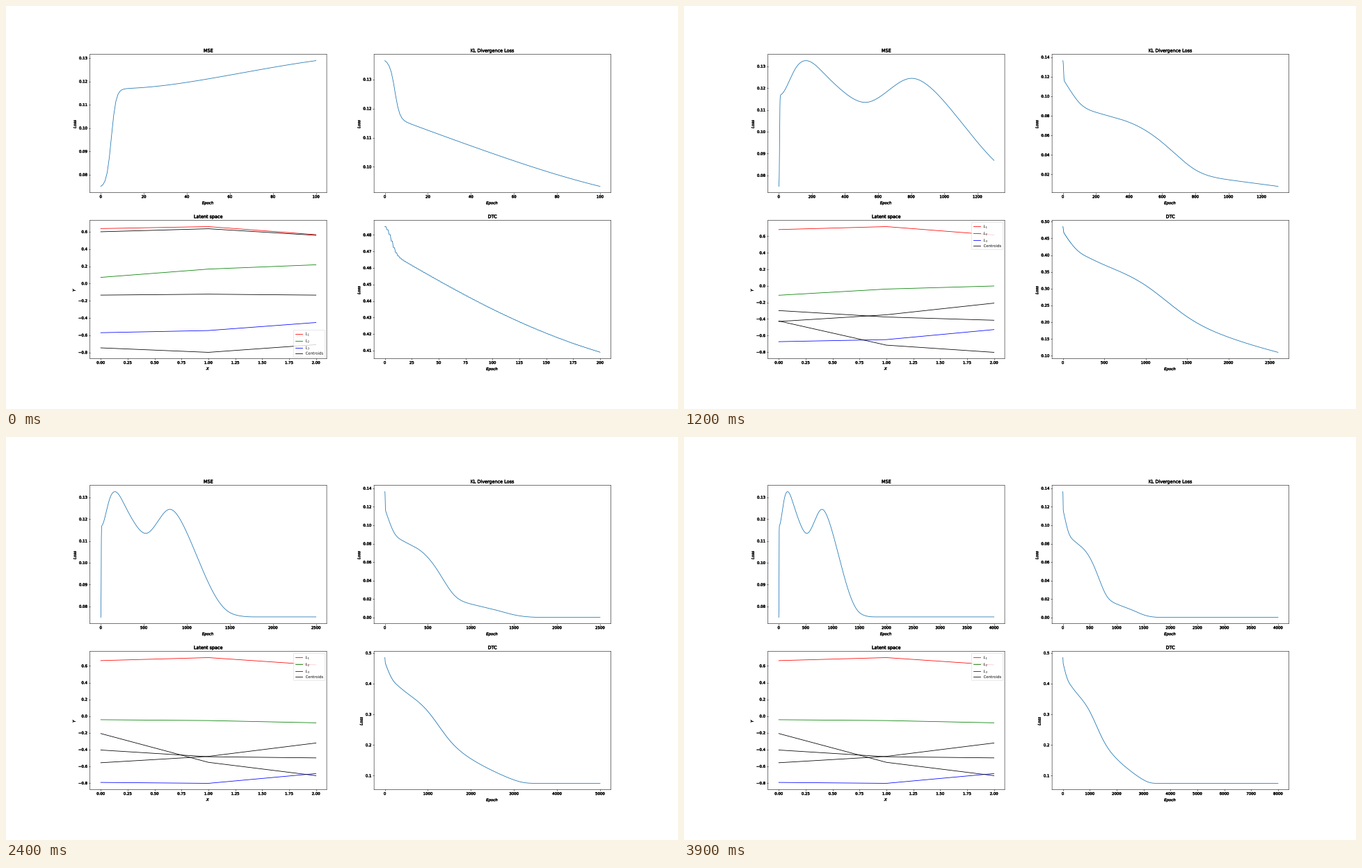
Animation of 966 by 580 pixels, one loop 4000 ms. Source, as a matplotlib script:

```python
import numpy as np
import matplotlib.pyplot as plt
from matplotlib import patheffects as pe
from matplotlib.animation import FuncAnimation

W, H, DPI = 966, 580, 38.64
FRAMES, INTERVAL, EPOCHS_PER_FRAME = 40, 100, 100
EPOCHS = np.arange(FRAMES * EPOCHS_PER_FRAME + 1)

plt.rcParams.update({
    "font.family": "DejaVu Sans", "font.size": 10, "axes.titlesize": 12,
    "axes.linewidth": 1.0, "xtick.major.width": 1.0, "ytick.major.width": 1.0,
    "lines.linewidth": 1.5, "text.hinting": "none",
})

# Text outside the plots is heavier than the legend's
HEAVY = [pe.Stroke(offset=(dx, 0), linewidth=0.4, foreground="black")
         for dx in (-0.25, 0.25)]
PLAIN = [pe.Normal()]


def spline(x, y, at):
    """Cubic spline that comes to rest at its last point and stays there."""
    x, y = np.asarray(x, float), np.asarray(y, float)
    n, h = len(x), np.diff(x)
    m = (np.diff(y, axis=0).T / h).T
    a, b = np.eye(n), np.zeros_like(y)
    a[0, :2], b[0] = (2, 1), 3 * m[0]
    for i in range(1, n - 1):
        a[i, i - 1:i + 2] = h[i], 2 * (h[i - 1] + h[i]), h[i - 1]
        b[i] = 3 * (h[i] * m[i - 1] + h[i - 1] * m[i])
    d = np.linalg.solve(a, b)
    at = np.clip(at, x[0], x[-1])
    i = np.clip(np.searchsorted(x, at, side="right") - 1, 0, n - 2)
    t = (at - x[i]) / h[i]
    return (y[i] * (1 + 2 * t) * (1 - t) ** 2 + y[i + 1] * t * t * (3 - 2 * t)
            + h[i] * t * (1 - t) * (d[i] * (1 - t) - d[i + 1] * t))


def loss(points, jump, middle):
    """Slow trend through key points plus a quick logistic start."""
    trend = spline(*zip(*points), EPOCHS)
    return trend + jump / (1 + np.exp(np.minimum((EPOCHS - middle) / 1.1, 50)))


MSE = loss([(0, .1166), (20, .1174), (50, .1211), (100, .1289), (162, .1326),
            (270, .1270), (400, .1178), (530, .1135), (660, .1188),
            (800, .1245), (900, .1213), (1000, .1138), (1300, .0869),
            (1450, .0786), (1600, .0758), (1800, .0752)], -.0421, 4.9)
KL = loss([(0, .1180), (50, .1046), (100, .0933), (200, .0836), (300, .0788),
           (400, .0734), (500, .0650), (600, .0528), (700, .0379),
           (800, .0248), (900, .0178), (1000, .0146), (1300, .0078),
           (1500, .0029), (1650, .0008), (1900, .0001)], .0187, 4.65)
DTC = loss([(0, .4708), (50, .4349), (100, .4089), (150, .3940), (250, .3708),
            (375, .3440), (500, .3095), (750, .2163), (900, .1751),
            (1000, .1553), (1300, .1100), (1500, .0864), (1600, .0785),
            (1800, .0752)], .0151, 3.05)
DTC = np.repeat(DTC, 2)[:-1]  # two batches per epoch

# Heights of each latent line at X = 0, 1, 2 at four epochs
KEYS = [100, 900, 1300, 1750]
LATENT = [
    ("red", "$L_1$", [(.637, .660, .567), (.677, .7035, .593),
                      (.681, .717, .616), (.663, .699, .612)]),
    ("green", "$L_2$", [(.071, .167, .217), (-.228, -.057, .077),
                        (-.113, -.038, -.001), (-.043, -.053, -.080)]),
    ("blue", "$L_3$", [(-.571, -.546, -.453), (-.572, -.509, -.377),
                       (-.674, -.649, -.528), (-.792, -.803, -.686)]),
    ("black", "Centroids", [(.600, .635, .559), (-.207, -.100, .014),
                            (-.430, -.349, -.208), (-.557, -.481, -.321)]),
    ("black", None, [(-.135, -.124, -.135), (-.196, -.283, -.352),
                     (-.298, -.376, -.415), (-.405, -.485, -.499)]),
    ("black", None, [(-.747, -.799, -.710), (-.599, -.777, -.775),
                     (-.424, -.716, -.803), (-.208, -.552, -.711)]),
]

fig, axes = plt.subplots(2, 2, figsize=(W / DPI, H / DPI), dpi=DPI,
                         facecolor="white")
fig.subplots_adjust(left=.125, right=.9, bottom=.125, top=.88,
                    wspace=.2, hspace=.2)
(ax_mse, ax_kl), (ax_lat, ax_dtc) = axes


def label(ax, title, xlabel="$Epoch$", ylabel="$Loss$"):
    ax.set(title=title, xlabel=xlabel, ylabel=ylabel)
    for text in (ax.title, ax.xaxis.label, ax.yaxis.label):
        text.set_path_effects(HEAVY)
    for spine in ax.spines.values():
        spine.set_snap(False)


label(ax_mse, "MSE")
label(ax_kl, "KL Divergence Loss")
label(ax_dtc, "DTC")
label(ax_lat, "Latent space", "$X$", "$Y$")

losses = [(ax.plot([], [], color="C0")[0], data, rate)
          for ax, data, rate in ((ax_mse, MSE, 1), (ax_kl, KL, 1),
                                 (ax_dtc, DTC, 2))]
paths = [(ax_lat.plot([0, 1, 2], keys[0], color=color, label=name)[0], keys)
         for color, name, keys in LATENT]
legend = ax_lat.legend(loc="best", labelspacing=.28)
for text in legend.get_texts():
    text.set_path_effects(PLAIN)


def update(frame):
    epoch = (frame + 1) * EPOCHS_PER_FRAME
    for line, data, rate in losses:
        count = epoch * rate + 1
        line.set_data(np.arange(count), data[:count])
    for line, keys in paths:
        line.set_ydata(spline(KEYS, keys, epoch))
    for ax in axes.flat:
        ax.relim()
        ax.autoscale_view()
        for text in ax.get_xticklabels() + ax.get_yticklabels():
            text.set_path_effects(HEAVY)
    return []


anim = FuncAnimation(fig, update, frames=FRAMES, interval=INTERVAL,
                     init_func=lambda: [], repeat=True, repeat_delay=0)
plt.show()
```
